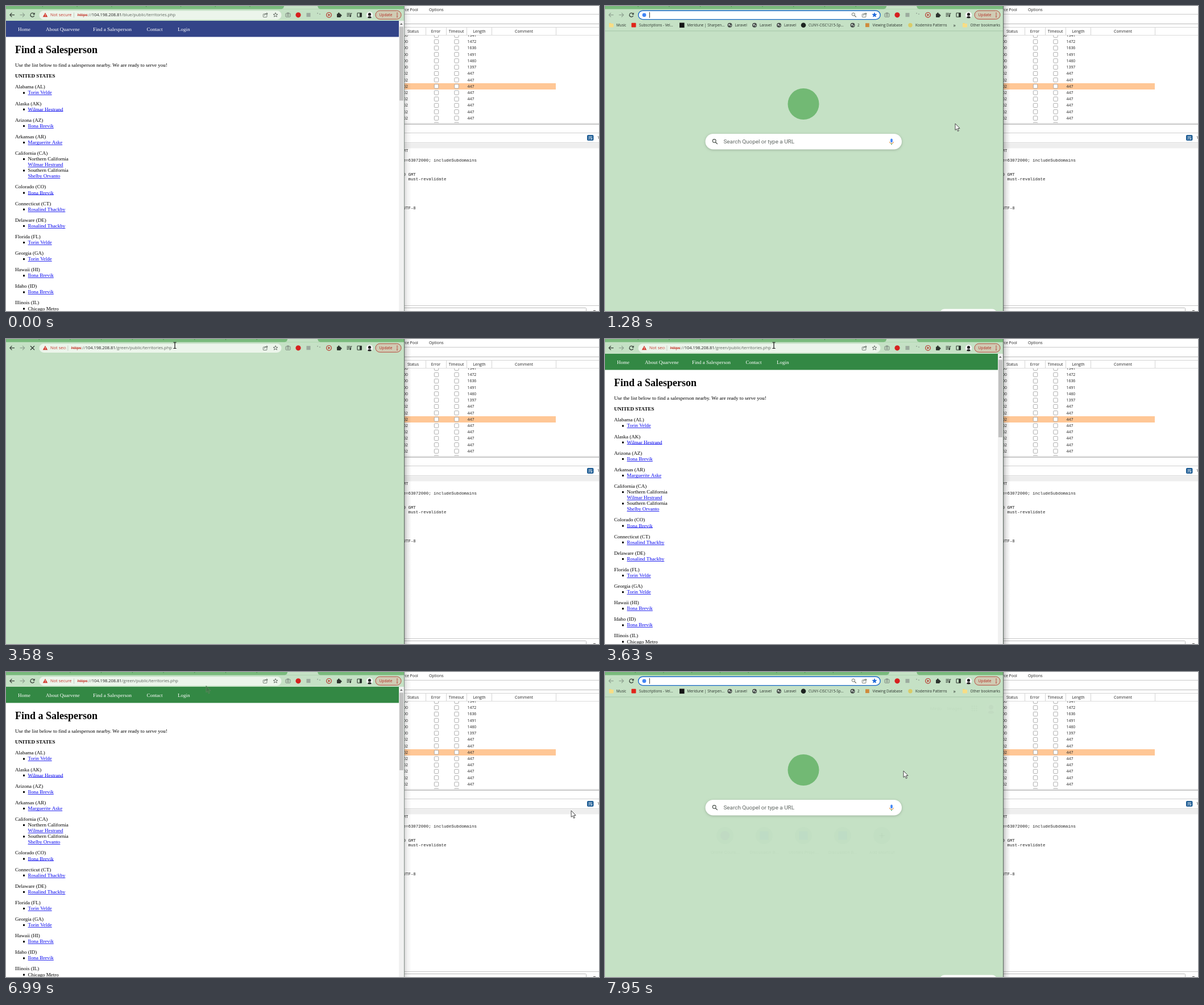
Recreate the animation shown at these times as an HTML page with a canvas. Size 1043x537 px, loop 8 s.

```html
<!DOCTYPE html>
<html lang="en">
<head>
<meta charset="utf-8">
<title>Browser session</title>
<style>
html, body { margin: 0; width: 100%; height: 100%; overflow: hidden; background: #fff; }
canvas { display: block; width: 1043px; height: 537px; }
</style>
</head>
<body>
<canvas id="stage"></canvas>
<script>
const W = 1043, H = 537, LOOP = 8000;
const canvas = document.getElementById('stage');
const ratio = window.devicePixelRatio || 1;
canvas.width = W * ratio;
canvas.height = H * ratio;
const c = canvas.getContext('2d');

const UI = '"Open Sans", "Noto Sans", sans-serif';
const SERIF = '"Liberation Serif", "Times New Roman", serif';
const MONO = '"Liberation Mono", "Courier New", monospace';
const ROBOTO = 'Roboto, sans-serif';
const MINT = '#c5e1c5', LEAF = '#72b974', DARK = '#333c35', RED = '#c5372c';
const HOST = 'https://104.198.208.81/';
const TYPED = HOST + 'green/public/salesperson.php?id=11';

// Moments of the hard changes, in ms
const AT = {
  focus: 600, open: 905, tiles: 1295, paste: 1480, go: 3325, blank: 3575, page: 3625, chip: 3675,
  blur: 5675, focus2: 7545, open2: 7845, tiles2: 7945
};

// y is the middle of the capitals; returns the width
function text(s, x, y, size, color = '#222', font = UI, weight = 400, align = 'left') {
  c.font = `${weight} ${size}px ${font}`;
  c.textAlign = align;
  c.fillStyle = color;
  c.fillText(s, x, y + size * 0.35);
  return c.measureText(s).width;
}
function rect(x, y, w, h, color) {
  c.fillStyle = color;
  c.fillRect(x, y, w, h);
}
function round(x, y, w, h, r, fill, stroke, lw = 1) {
  c.beginPath();
  c.roundRect(x, y, w, h, r);
  if (fill) { c.fillStyle = fill; c.fill(); }
  if (stroke) { c.strokeStyle = stroke; c.lineWidth = lw; c.stroke(); }
}
function disc(x, y, r, fill, stroke, lw = 1) {
  c.beginPath();
  c.arc(x, y, r, 0, 7);
  if (fill) { c.fillStyle = fill; c.fill(); }
  if (stroke) { c.strokeStyle = stroke; c.lineWidth = lw; c.stroke(); }
}
function line(pts, color, lw = 1) {
  c.beginPath();
  for (let i = 0; i < pts.length; i += 2) c.lineTo(pts[i], pts[i + 1]);
  c.strokeStyle = color;
  c.lineWidth = lw;
  c.stroke();
}
function poly(pts, fill) {
  c.beginPath();
  for (let i = 0; i < pts.length; i += 2) c.lineTo(pts[i], pts[i + 1]);
  c.closePath();
  c.fillStyle = fill;
  c.fill();
}
function clipped(x, y, w, h, draw) {
  c.save();
  c.beginPath();
  c.rect(x, y, w, h);
  c.clip();
  draw();
  c.restore();
}
function shadowed(blur, alpha, draw) {
  c.save();
  c.shadowColor = `rgba(0,0,0,${alpha})`;
  c.shadowBlur = blur * ratio;
  c.shadowOffsetY = ratio;
  draw();
  c.restore();
}

// Icons
function globe(x, y, r = 4) {
  disc(x, y, r, '#444b48');
  poly([x - r * .7, y - r * .3, x, y - r * .6, x + r * .1, y, x - r * .4, y + r * .3], '#cfd8d0');
  poly([x + r * .2, y + r * .1, x + r * .8, y - r * .1, x + r * .4, y + r * .7], '#cfd8d0');
}
function lens(x, y, r, color, lw) {
  disc(x - r * .3, y - r * .3, r * .68, null, color, lw);
  line([x + r * .2, y + r * .2, x + r, y + r], color, lw * 1.2);
}
function star(x, y, r, fill, stroke) {
  c.beginPath();
  for (let i = 0; i < 10; i++) {
    const a = i * Math.PI / 5 - Math.PI / 2, q = i % 2 ? r * .42 : r;
    c.lineTo(x + q * Math.cos(a), y + q * Math.sin(a));
  }
  c.closePath();
  if (fill) { c.fillStyle = fill; c.fill(); }
  c.strokeStyle = stroke;
  c.lineWidth = .8;
  c.stroke();
}
function person(x, y, r) {
  c.save();
  disc(x, y, r, '#f6f6f6');
  c.clip();
  disc(x, y - r * .2, r * .45, '#222');
  disc(x, y + r, r * .6, '#222');
  c.restore();
}
function folder(x, y) {
  round(x - 4, y - 3.5, 4, 3, 1, '#f4d675');
  round(x - 4, y - 2.6, 8, 6.4, 1, '#f7dd86');
}
function arrow(x, y, dir, color) {
  line([x - 4 * dir, y, x + 3.8 * dir, y], color, 1.2);
  line([x + .6 * dir, y - 3.6, x + 4.1 * dir, y, x + .6 * dir, y + 3.6], color, 1.2);
}
function reload(x, y) {
  c.beginPath();
  c.arc(x, y, 3.4, .4, 5.5);
  c.strokeStyle = DARK;
  c.lineWidth = 1.2;
  c.stroke();
  poly([x + 4.2, y - 4.2, x + 4.2, y - .4, x + .4, y - .4], DARK);
}

// Right-hand window
function proxyWindow() {
  rect(700, 0, 343, H, '#fff');
  text('rce Pool', 699, 6.5, 6.9);
  text('Options', 744, 6.5, 6.9);
  rect(700, 14, 343, 1, '#c9c9c9');
  rect(700, 31, 343, 1, '#b9b9b9');
  rect(700, 37, 343, 1, '#d4d4d4');
  rect(700, 51, 343, 1, '#dcdcdc');
  for (const x of [738, 774, 810, 854, 967]) rect(x, 38, 1, 13, '#d5d5d5');
  [['Status', 716], ['Error', 756], ['Timeout', 792], ['Length', 832.5], ['Comment', 911]]
    .forEach(([s, x]) => text(s, x, 44.5, 6.9, '#222', UI, 400, 'center'));

  const sizes = [1341, 1472, 1636, 1491, 1460, 1397];
  clipped(700, 51.5, 343, 154.5, () => {
    rect(700, 136, 267, 11, '#ffc796');
    for (let i = 0; i < 15; i++) {
      const y = 51.6 + i * 11.22;
      text(i < 6 ? '200' : '302', 695, y, 6.9);
      for (const x of [757, 792.5]) round(x - 3.7, y - 3.7, 7.4, 7.4, 1.4, '#fff', '#999', .8);
      text(String(sizes[i] || 447), 811.5, y, 6.9);
    }
  });
  rect(700, 206, 343, 3, '#e2e2e2');
  rect(700, 208, 343, 1, '#bdbdbd');
  rect(700, 223, 343, 1, '#cfcfcf');
  rect(700, 240, 343, 1, '#d8d8d8');
  rect(700, 241.5, 343, 9, '#eeeeee');
  round(1022, 227, 11.5, 10, 2, '#1d5c94');
  line([1024.5, 230, 1031, 230], '#fff', .9);
  line([1024.5, 232.3, 1030.5, 232.3, 1030.5, 234.6, 1028, 234.6], '#fff', .9);
  line([1024.5, 234.6, 1026.5, 234.6], '#fff', .9);
  text('V', 1041, 231.5, 6.9);
  [['MT', 254], ['e=63072000; includeSubdomains', 271], ['0 GMT', 296],
   [', must-revalidate', 304.5], ['UTF-8', 355]]
    .forEach(([s, y]) => text(s, 698.5, y, 7.45, '#222', MONO));
  rect(700, 527, 343, 1, '#c8c8c8');
  round(690, 531.5, 330.5, 12, 1, '#fff', '#bbb', 1);
  rect(1033, 536, 4, 1, '#555');
}

function windowEdge(focused) {
  const a = focused ? .26 : .16;
  const g = c.createLinearGradient(701, 0, 713, 0);
  g.addColorStop(0, `rgba(0,0,0,${a})`);
  g.addColorStop(.35, `rgba(0,0,0,${a * .4})`);
  g.addColorStop(1, 'rgba(0,0,0,0)');
  rect(701, 0, 12, H, g);
  rect(700, 0, 1, H, focused ? '#5d6b60' : '#86918a');
}

// Browser chrome
function tabStrip(count) {
  const pitch = 547 / count, x = 3 + pitch * (count - 1);
  rect(0, 0, 700, 5.5, '#79ba7c');
  for (let i = 1; i < count - 1; i++) rect(3 + i * pitch, 0, 1, 1.5, '#4d8752');
  poly([x - 5, 5.5, x - 1.5, 4, x, 0, 548, 0, 549.5, 4, 553, 5.5], MINT);
}

function toolbar(s) {
  rect(0, 5, 700, 21, MINT);
  tabStrip(s.tabs);
  const faint = '#8da18f';
  arrow(11, 15.7, -1, s.ntp ? faint : DARK);
  arrow(28.5, 15.7, 1, faint);
  if (s.loading) {
    line([43, 12.3, 50, 19.3], DARK, 1.3);
    line([50, 12.3, 43, 19.3], DARK, 1.3);
  } else reload(46.5, 15.7);

  // extensions
  round(492, 13, 8, 6.2, 1, null, '#7b847d', 1);
  rect(494.2, 11.6, 3.6, 1.6, '#7b847d');
  disc(496, 16, 1.5, null, '#7b847d', .9);
  disc(514, 15.8, 4.6, '#d6201f');
  rect(528.5, 12.2, 7, 7, '#9cab9e');
  rect(547, 12, 2, 1.5, '#97a999');
  rect(551, 13.5, 2, 1.5, '#97a999');
  disc(568, 15.8, 4.3, null, '#b8352c', 1.2);
  poly([566.7, 13.6, 570.4, 15.8, 566.7, 18], '#b8352c');
  round(582, 13.4, 6.8, 6.6, 1, '#2d342f');
  disc(585.3, 13, 1.5, '#2d342f');
  disc(589, 16.6, 1.5, '#2d342f');
  for (const y of [12.5, 15, 17.5]) rect(599.5, y, y > 17 ? 3.5 : 6, 1.1, '#2d342f');
  disc(605.5, 18, 1.4, '#2d342f');
  line([606.5, 18, 606.5, 13, 608.5, 13], '#2d342f', 1);
  round(618, 12.2, 7.4, 7, .8, null, '#2d342f', 1.1);
  rect(622, 12.2, 3.4, 7, '#2d342f');
  person(639.5, 15.8, 5.8);
  round(650, 8.2, 45, 15, 7.5, '#d0cbb3', '#b5493c', 1);
  text('Update', 656.5, 15.8, 6.7, '#b3261e');
  for (const y of [12.6, 15.8, 19]) disc(688, y, .9, '#b3261e');
}

function shareAndStar(active) {
  round(452.3, 14, 6.6, 5.6, .8, null, '#5c665e', .8);
  line([454.5, 17, 456, 13.5, 460, 13.5], '#5c665e', .9);
  line([458.2, 11.6, 460.2, 13.5, 458.2, 15.4], '#5c665e', .9);
  star(474, 15.8, 4.1, active && '#1a66d8', active ? '#1a66d8' : '#4d564f');
}

function secureUrl(path, partial) {
  round(58.5, 8.3, 426, 15.6, 7.8, '#ecf5eb');
  poly([69, 11.8, 73.2, 19.2, 64.8, 19.2], '#d13428');
  rect(68.6, 14.3, .9, 2.6, '#fff');
  rect(68.6, 17.4, .9, .9, '#fff');
  clipped(78, 6, partial ? 27.5 : 60, 20, () => text('Not secure', 78, 15.8, 7.45, RED));
  rect(partial ? 108.5 : 119, 11.5, .8, 9, '#b9c5b9');
  let x = partial ? 114.5 : 125.5;
  const w = text('https', x, 15.8, 7.45, RED);
  line([x, 16.2, x + w, 16.2], RED, .9);
  x += w;
  x += text('://', x, 15.8, 7.45, '#6a726b');
  x += text('104.198.208.81', x, 15.8, 7.45, '#222');
  text(path, x, 15.8, 7.45, '#5c645d');
  shareAndStar(false);
}

function caret(x) { rect(x, 10.8, .9, 10, '#222'); }

function emptyOmnibox() {
  round(58.7, 8.2, 425.4, 15.4, 7.7, '#fff', '#1b6ac9', 1.4);
  disc(69, 15.8, 3.4, '#4285f4');
  caret(78);
  lens(438, 15.8, 3.8, '#59625b', .9);
  shareAndStar(true);
}

function dropdown(blinkOn) {
  shadowed(5, .35, () => round(55.3, 5.6, 432, 67, 4, '#fff'));
  rect(55.3, 26, 432, 21, '#dde4ea');
  rect(55.3, 26, 1.8, 21, '#1f62c9');
  globe(69, 16);
  const w = text(TYPED, 84, 15.8, 7.45, '#555c57');
  if (blinkOn) caret(84 + w + .3);
  globe(69, 36.5);
  text(TYPED, 84, 36.5, 7.45, '#1c56b8', UI, 700);
  lens(69, 57.7, 3.6, '#59625b', .9);
  const q = text(TYPED, 84, 57.8, 7.45, '#333');
  text(' - Quopel Search', 84 + q, 57.8, 7.45, '#6d746f');
}

function bookmarks() {
  rect(0, 26, 700, 17.5, MINT);
  rect(0, 43.4, 700, 1, '#a5c6a7');
  folder(11, 33.6);
  round(46.5, 29.8, 8, 7.6, 1, '#e1251b');
  rect(131, 29.5, 8.6, 8.6, '#141414');
  for (const x of [219.5, 263, 306]) globe(x, 33.7);
  disc(349, 33.7, 4.3, '#1d2320');
  globe(435.5, 33.7);
  rect(458, 30.3, 6.8, 6.8, '#cf8a3c');
  disc(537, 33.7, 3.7, '#d9cb68');
  folder(633, 33.6);
  [['Music', 20], ['Subscriptions - Vel...', 60], ['Meridune | Sharpen...', 144.5],
   ['Laravel', 228.5], ['Laravel', 272], ['Laravel', 315], ['CUNY-CISC1215-Sp...', 358],
   ['2', 444], ['Viewing Database', 470.5], ['Kodemira Patterns', 546],
   ['»', 612.5], ['Other bookmarks', 642.5]]
    .forEach(([s, x]) => text(s, x, 33.7, s === '»' ? 8.5 : 6.4, '#2a322c'));
}

function newTabPage(fade) {
  rect(0, 26, 700, 511, MINT);
  bookmarks();
  disc(349, 172.5, 27.5, LEAF);
  shadowed(4, .22, () => round(176.5, 225, 345.5, 27.6, 13.8, '#fff'));
  lens(193.5, 238.8, 4.3, '#4a524c', 1.1);
  text('Search Quopel or type a URL', 208.5, 239, 9.9, '#5f6662', ROBOTO);
  round(502.2, 233.6, 3.6, 6.8, 1.8, '#4285f4');
  c.beginPath();
  c.arc(504, 238.6, 3.6, .1, 3.05);
  c.strokeStyle = '#e08a3a';
  c.lineWidth = 1;
  c.stroke();
  rect(503.4, 242, 1.2, 2.4, '#3f9d58');
  round(589, 533.5, 100, 16, 8, '#fff');

  if (fade <= 0) return;
  c.save();
  c.globalAlpha = fade;
  ['Online Cours...', 'Discussion B...', 'Utilities Proje...', 'Discussion B...', 'Add shortcut']
    .forEach((label, i) => {
      const x = 211 + i * 69;
      disc(x, 288, 15, '#8dc891');
      if (i === 0) disc(x, 288, 8, '#a035e8');
      else if (i < 4) rect(x - 7.5, 280.5, 15, 15, '#4285f4');
      else {
        rect(x - 4.5, 287.4, 9, 1.2, '#222');
        rect(x - .6, 283.5, 1.2, 9, '#222');
      }
      text(label, x, 317.6, 7.8, '#2a322c', ROBOTO, 400, 'center');
    });
  text('Mirdo', 572, 64, 7.9, '#2a322c', ROBOTO);
  text('Images', 602, 64, 7.9, '#2a322c', ROBOTO);
  for (let i = 0; i < 9; i++) {
    rect(644.8 + (i % 3) * 3.8, 59.3 + Math.floor(i / 3) * 3.8, 2.2, 2.2, '#4d5a50');
  }
  person(679, 64, 9.5);
  c.restore();
}

// Sales page
const ANN = 'Torin Velde', ROB = 'Wilmar Hestrand', IRA = 'Ilona Brevik', BAB = 'Rosalind Thackby';
const STATES = [
  ['Alabama (AL)', ANN], ['Alaska (AK)', ROB], ['Arizona (AZ)', IRA],
  ['Arkansas (AR)', 'Marguerite Aske'],
  ['California (CA)', '*Northern California', '-' + ROB, '*Southern California', '-Shelby Orvanto'],
  ['Colorado (CO)', IRA], ['Connecticut (CT)', BAB], ['Delaware (DE)', BAB],
  ['Florida (FL)', ANN], ['Georgia (GA)', ANN], ['Hawaii (HI)', IRA], ['Idaho (ID)', IRA],
  ['Illinois (IL)', '*Chicago Metro']
];

function salesPage(barColor, thumb) {
  rect(0, 26, 700, 511, '#fff');
  rect(0, 26, 691, 28.4, barColor);
  [['Home', 21], ['About Quarvene', 70], ['Find a Salesperson', 153], ['Contact', 247.5], ['Login', 302]]
    .forEach(([s, x]) => text(s, x, 41, 9, '#fff', SERIF));
  text('Find a Salesperson', 16, 76.5, 18, '#000', SERIF, 700);
  text('Use the list below to find a salesperson nearby. We are ready to serve you!', 16, 104, 9, '#000', SERIF);
  text('UNITED STATES', 16, 123, 9, '#000', SERIF, 700);
  let y = 142.2;
  for (const [state, ...items] of STATES) {
    text(state, 16, y, 9, '#000', SERIF);
    y += 10.1;
    for (const item of items) {
      const plain = item[0] === '*', name = item.replace(/^[*-]/, '');
      if (item[0] !== '-') rect(30, y - .8, 3, 3, '#000');
      const w = text(name, 38.6, y, 9, plain ? '#000' : '#0000ee', SERIF);
      if (!plain) rect(38.6, Math.round(y + 4), w, .8, '#0000ee');
      y += 10.1;
    }
    y += 8.95;
  }
  rect(691, 26, 9, 511, '#f1f1f1');
  poly([693, 33, 697.6, 33, 695.3, 30], '#666');
  rect(692, 36.5, 7, thumb, '#c1c1c1');
}

// Pointer: strokes of the hand as [start, end, from, to, easing]; it rests between strokes
// of one group and is off the stage between groups.
const EASE = {
  in: u => u * u,
  out: u => u * (2 - u),
  both: u => u * u * (3 - 2 * u)
};
const STROKES = [
  [[50, 610, [1015, 250], [597, -6], 'out'], [610, 780, [597, -6], [599, -16], 'both'],
   [780, 1280, [599, -16], [616, 207], 'both'], [1300, 2080, [616, 207], [187, 11], 'both'],
   [2080, 2470, [187, 11], [297, 11], 'both'], [4280, 4755, [297, 11], [991, 116], 'in']],
  [[6985, 7590, [1003, 249], [553, -6], 'out'], [7590, 7780, [553, -6], [552, -16], 'both'],
   [7780, 7945, [552, -16], [525, 174], 'out'], [7945, LOOP, [525, 174], [525, 174], 'out']]
];

function pointerAt(t) {
  const group = STROKES.find(g => t >= g[0][0] && t < g[g.length - 1][1]);
  if (!group) return null;
  const [start, end, from, to, ease] = group.filter(s => t >= s[0]).pop();
  const e = EASE[ease](Math.min(1, (t - start) / (end - start)));
  return from.map((v, i) => v + (to[i] - v) * e);
}

function arrowPointer(x, y, fill = '#fff', edge = '#333') {
  c.beginPath();
  [0, 0, 0, 11.5, 2.6, 9.2, 4.5, 13.5, 6.3, 12.7, 4.5, 8.6, 8, 8.4]
    .forEach((v, i, a) => { if (i % 2) c.lineTo(x + a[i - 1], y + v); });
  c.closePath();
  c.fillStyle = fill;
  c.fill();
  c.strokeStyle = edge;
  c.lineWidth = .9;
  c.stroke();
}

function beamPointer(x, y) {
  rect(x - .6, y - 5, 1.2, 10.5, '#111');
  rect(x - 2.6, y - 5.5, 5.2, 1, '#111');
  rect(x - 2.6, y + 5, 5.2, 1, '#111');
}

function drawPointer(t) {
  const p = pointerAt(t);
  if (!p) return;
  const [x, y] = p;
  if (y > 5 && y < 23 && x > 75 && x < 480) beamPointer(x, y);
  else arrowPointer(x, y);
}

function draw(t) {
  c.setTransform(ratio, 0, 0, ratio, 0, 0);
  const second = t >= AT.open2;
  const ntp = second || (t >= AT.open && t < AT.blank);
  const loading = t >= AT.go && t < AT.page;

  proxyWindow();
  toolbar({ tabs: second ? 11 : t < AT.open ? 9 : 10, ntp, loading });

  if (ntp) {
    newTabPage(Math.min(1, (t - (second ? AT.tiles2 : AT.tiles)) / 200));
    if (second || t < AT.paste) emptyOmnibox();
    else if (t < AT.go) dropdown(t < 2000 || (t >= 2530 && t < 3055));
    else {
      round(58.5, 8.3, 426, 15.6, 7.8, '#ecf5eb');
      globe(69, 16);
      text(TYPED, 84, 15.8, 7.45, '#555c57');
      shareAndStar(false);
    }
  } else if (t < AT.open) {
    salesPage('#334488', 130);
    secureUrl('/blue/public/territories.php');
  } else {
    if (t < AT.page) rect(0, 26, 700, 511, MINT);
    else salesPage('#338844', 136.5);
    secureUrl('/green/public/territories.php', t < AT.chip);
    if (t >= 4450) arrowPointer(352, 24.5, '#3f7a49', '#5a8a5c');
  }
  windowEdge((t >= AT.focus && t < AT.blur) || t >= AT.focus2);
  drawPointer(t);
}

function tick(now) {
  draw(now % LOOP);
  requestAnimationFrame(tick);
}
draw(0);
requestAnimationFrame(tick);
</script>
</body>
</html>
```
